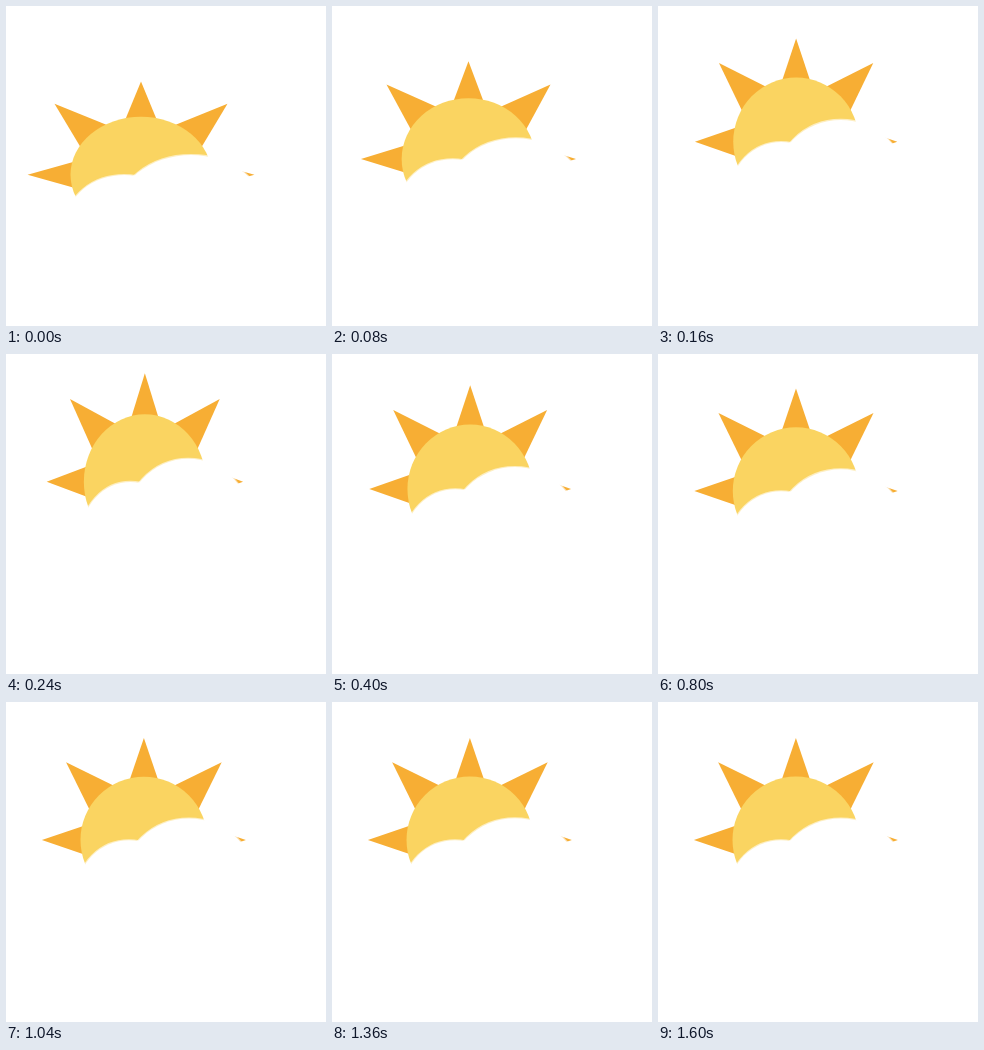
Animation of 320x320 px, one loop 1.92 s. Source, as an HTML page:

```html
<!DOCTYPE html>
<html lang="en">
<head>
<meta charset="utf-8">
<title>Bouncing sun</title>
<style>
  html, body { margin: 0; width: 100%; height: 100%; overflow: hidden; background: #fff; }
  svg { display: block; width: 100vw; height: 100vh; }
</style>
</head>
<body>
<svg viewBox="0 0 320 320">
  <g id="scene">
    <g id="rays" fill="#f7ae34"></g>
    <circle r="63.4" fill="#fad461"/>
    <!-- white cloud with a soft rim -->
    <g fill="#fff" stroke="#fff" stroke-opacity=".6" stroke-width="2">
      <circle cx="-15" cy="52" r="51.8"/>
      <ellipse cx="45" cy="44" rx="67.5" ry="65.6"/>
      <rect x="-50" y="40" width="120" height="64"/>
    </g>
  </g>
</svg>
<script>
const LOOP = 1920, STEP = 80;
const PERIOD = 590, DECAY = 0.0038, DROP = 30.8;
const scene = document.getElementById('scene');
const rays = document.getElementById('rays');

function addRay(angle, tip) {
  const base = 45, half = (tip - base) * 0.34;
  const ray = document.createElementNS('http://www.w3.org/2000/svg', 'path');
  ray.setAttribute('d', `M${tip} 0L${base} ${half}V${-half}Z`);
  ray.setAttribute('transform', `rotate(${angle})`);
  rays.append(ray);
}

// diagonal rays are a little longer
for (let i = 0; i < 5; i++) addRay(180 + i * 45, i % 2 ? 110 : 102);

function draw(now) {
  const t = Math.floor((now % LOOP) / STEP) * STEP;
  // damped spring: 1 at the lowest point, 0 at rest
  const u = Math.exp(-DECAY * t) * Math.cos(2 * Math.PI * t / PERIOD);
  const x = 137.9 - 2.9 * u, y = 138 + DROP * u;
  const sx = 1 + 0.112 * u;
  const sy = 1 - (u > 0 ? 0.085 : 0.185) * u; // stretches more than it squashes
  scene.setAttribute('transform', `translate(${x} ${y}) scale(${sx} ${sy})`);
}

const start = performance.now();
function tick() {
  draw(performance.now() - start);
  requestAnimationFrame(tick);
}
tick();
</script>
</body>
</html>
```
